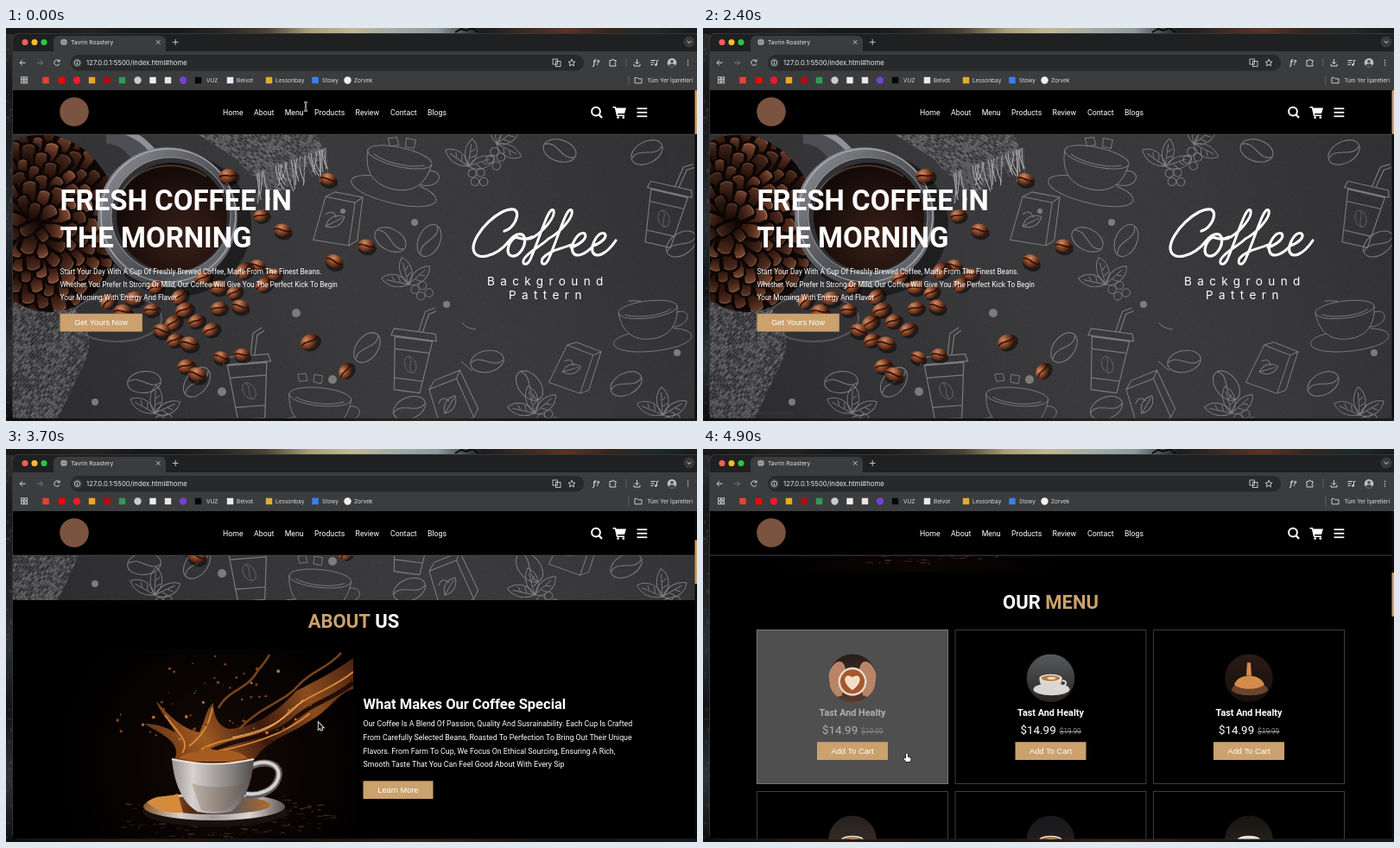
Recreate the animation shown at these times as an HTML page with a canvas. Size 800 by 455 pixels, loop 5000 ms.

```html
<!DOCTYPE html>
<html lang="en">
<head>
<meta charset="utf-8">
<title>Coffee shop page</title>
<style>
html, body { margin: 0; width: 100%; height: 100%; overflow: hidden; background: #111; }
canvas { display: block; width: 800px; height: 455px; }
</style>
</head>
<body>
<canvas id="stage" width="800" height="455"></canvas>
<script>
const GOLD = '#cba16d', LOOP = 5000, STEP = 100;
const UI = 'Inter, sans-serif', BODY = 'Roboto, sans-serif', BTN = '"Liberation Sans", Arial, sans-serif';
const stage = document.getElementById('stage').getContext('2d');
let g = stage;

let seed = 7;
const rnd = () => {
  seed = (seed + 0x6D2B79F5) | 0;
  let v = Math.imul(seed ^ (seed >>> 15), 1 | seed);
  v = (v + Math.imul(v ^ (v >>> 7), 61 | v)) ^ v;
  return ((v ^ (v >>> 14)) >>> 0) / 4294967296;
};
const span = (a, b) => a + (b - a) * rnd();

// Drawing helpers, all on the current context g
const rect = (x, y, w, h, c) => { g.fillStyle = c; g.fillRect(x, y, w, h); };
const round = (x, y, w, h, r, c) => { g.fillStyle = c; g.beginPath(); g.roundRect(x, y, w, h, r); g.fill(); };
const oval = (x, y, rx, ry, c, rot = 0) => {
  g.fillStyle = c; g.beginPath(); g.ellipse(x, y, rx, ry, rot, 0, 7); g.fill();
};
const dot = (x, y, r, c) => oval(x, y, r, r, c);
const ring = (x, y, rx, ry, c, w = 1, rot = 0) => {
  g.strokeStyle = c; g.lineWidth = w; g.beginPath(); g.ellipse(x, y, rx, ry, rot, 0, 7); g.stroke();
};
const fill = (d, c) => { g.fillStyle = c; g.fill(new Path2D(d)); };
const line = (d, c, w = 1) => { g.strokeStyle = c; g.lineWidth = w; g.stroke(new Path2D(d)); };
const text = (s, x, y, font, c = '#fff', align = 'left') => {
  g.font = font; g.fillStyle = c; g.textAlign = align; g.fillText(s, x, y);
};
const at = (x, y, rot, k, fn) => {
  g.save(); g.translate(x, y); g.rotate(rot); g.scale(k, k); fn(); g.restore();
};
const stops = (grad, cols) => {
  cols.forEach((c, i) => grad.addColorStop(i / (cols.length - 1), c));
  return grad;
};
const linear = (x0, y0, x1, y1, ...cols) => stops(g.createLinearGradient(x0, y0, x1, y1), cols);
const radial = (x, y, r, ...cols) => stops(g.createRadialGradient(x, y, 0, x, y, r), cols);
const button = (label, x, y, w, h = 20.8) => {
  rect(x, y, w, h, GOLD);
  text(label, x + w / 2, y + h / 2 + 3.3, '9.28px ' + BTN, '#fff', 'center');
};
const twoTone = (a, ca, b, cb, cx, y) => {
  g.font = 'bold 22px ' + BODY;
  const wa = g.measureText(a).width, x = cx - (wa + g.measureText(b).width) / 2;
  text(a, x, y, g.font, ca);
  text(b, x + wa, y, g.font, cb);
};

// Chalk drawings
const CHALK = '#88888a';
const chalkBean = () => {
  ring(0, 0, 18, 11.5, CHALK);
  line('M-17 -2C-6 -10 6 10 17 2', CHALK);
};
const paperCup = () => {
  line('M-19 -20L-13 33H13L19 -20ZM-23 -21L-21 -28H21L23 -21ZM-17 -8H17M-14 21H14M4 -28L8 -49L17 -54M8 -28L12 -47L19 -51', CHALK);
  at(0, 6, 1.1, .48, chalkBean);
};
const mug = () => line('M-38 -18A38 11 0 1 0 38 -18A38 11 0 1 0 -38 -18M-38 -18C-36 12 -18 20 0 20C18 20 36 12 38 -18' +
  'M37 -10C56 -14 54 10 28 8M-28 10C-66 16 -50 36 4 36C58 36 66 16 30 10M-30 -15C-16 -8 16 -8 30 -15', CHALK);
const cubes = () => line('M-16 -3L-6 -5L-3 4L-13 6ZM5 -5L16 -4L15 6L5 5Z', CHALK);
const bag = () => line('M-18 -22L14 -26L22 20L-16 26ZM-18 -22L-10 -30L20 -34L14 -26M20 -34L29 12L22 20' +
  'M-8 8C-8 -4 0 -8 8 -8C8 2 2 8 -8 8ZM-8 8L6 -6M-12 -4C-8 -10 -4 -10 0 -4', CHALK);
const sprig = () => {
  for (const a of [-.2, .9, 2]) at(0, 0, a, 1, () =>
    line('M0 0C-4 -15 -20 -20 -31 -14C-26 -3 -14 3 0 0M0 0L-25 -11M-9 -5L-10 -12M-16 -8L-18 -14', CHALK));
  for (const [x, y] of [[8, 6], [17, 1], [15, 14], [25, 10]]) ring(x, y, 5, 5, CHALK);
};

const roastBean = (x, y) => at(x, y, span(-1, .4), span(.95, 1.15), () => {
  oval(1.5, 3, 10, 7.5, 'rgba(0,0,0,.5)');
  oval(0, 0, 9.6, 7, radial(-2, -3, 11, '#d08c66', '#8e4a2b', '#3a170b'));
  line('M-9 0C-3 -4 3 4 9 0', '#2a0f07', 1.5);
});

// Coarse cloth: short light and dark threads on a tilted grid
function weave(d, base, rot) {
  g.save();
  g.clip(new Path2D(d));
  fill(d, base);
  g.translate(180, 270); g.rotate(rot);
  for (let y = -260; y < 260; y += 3) for (let x = -260; x < 260; x += 5) {
    const shade = .5 + .5 * Math.sin(y / 11) * Math.cos(x / 17);
    rect(x + span(-2, 2), y, span(2, 5), 1.5, rnd() < .3 + shade * .3 ? 'rgba(150,150,155,.42)' : 'rgba(12,12,15,.5)');
  }
  g.restore();
}

// Scales laid on a golden-angle spiral, outermost first
function pineCone() {
  const n = 120;
  g.save();
  g.beginPath(); g.ellipse(46, 226, 86, 103, -.15, 0, 7); g.clip();
  rect(0, 110, 170, 230, '#140b08');
  for (let i = n; i > 0; i--) {
    const a = i * 2.4, r = Math.sqrt(i / n);
    at(32 + Math.cos(a) * r * 92, 226 + Math.sin(a) * r * 104, a + span(-.25, .25), span(.75, 1.15), () => {
      fill('M-22 -8L8 -11C16 -7 16 7 8 11L-22 8Z', '#0f0705');
      g.globalAlpha = span(.45, 1);
      fill('M-16 -3C-6 -8 2 -9 8 -7C12 -3 12 4 8 6C1 7 -8 5 -16 3Z', linear(-16, 0, 12, 0, '#1d0e09', '#4e2719', '#93573c'));
      line('M8 -7C12 -3 12 4 8 6', '#b5795b', 1.1);
      g.globalAlpha = 1;
    });
  }
  rect(0, 110, 170, 230, linear(8, 0, 140, 0, 'rgba(0,0,0,.25)', 'rgba(0,0,0,0)', 'rgba(0,0,0,.35)'));
  g.restore();
}

function hero() {
  g.save();
  g.beginPath(); g.rect(8, 72, 790, 380); g.clip();
  rect(8, 72, 790, 380, linear(8, 452, 740, 123, '#2b2b2d', '#343437', '#3a3a3c', '#39393b', '#323234'));
  for (let i = 0; i < 4500; i++) rect(span(8, 798), span(123, 452), 1, 1, rnd() < .5 ? 'rgba(255,255,255,.06)' : 'rgba(0,0,0,.16)');

  g.globalAlpha = .85;
  at(452, 167, .22, 1, mug);
  at(458, 132, .1, 1, cubes);
  at(745, 342, -.12, .9, mug);
  at(362, 444, .1, .95, mug);
  at(352, 405, .1, .9, cubes);
  at(469, 383, .13, 1.15, paperCup);
  at(281, 413, -.08, 1.2, paperCup);
  at(763, 214, .22, 1.15, paperCup);
  at(381, 224, .32, 1.08, bag);
  at(655, 395, .5, 1, bag);
  at(514, 436, -.25, 1.05, bag);
  for (const [x, y, r] of [[445, 245, .5], [490, 246, 2], [418, 370, 2.2], [467, 440, -.4], [557, 386, -.2], [606, 414, .9],
    [718, 412, -.5], [160, 410, -.1], [221, 410, -.9], [641, 142, .3], [742, 144, -.5], [782, 250, -.6]]) at(x, y, r, 1.08, chalkBean);
  for (const [x, y, r] of [[535, 160, .4], [466, 297, 0], [568, 134, 1.2], [172, 446, .3], [612, 446, 0], [760, 448, .2]]) at(x, y, r, .95, sprig);
  for (const [x, y, r] of [[473, 225, 4], [336, 330, 5], [378, 407, 5], [103, 433, 4], [390, 212, 3], [510, 320, 4], [250, 421, 5], [777, 376, 4]]) dot(x, y, r, CHALK);
  line('M720 316H735M528 341C532 347 538 348 544 349M527 386L540 397', CHALK);
  g.globalAlpha = 1;

  weave('M8 300C40 290 70 300 80 326C98 345 100 370 91 388C78 412 72 430 60 452H8Z', '#48484b', -.85);
  weave('M222 123H360L371 150L340 164L318 196L294 180L264 150Z', '#535356', .55);
  for (let i = 0; i < 46; i++) {
    const u = i / 45, x = 371 - u * 80, y = 148 + u * 30;
    line(`M${x} ${y - 10}q${span(-4, 4)} 12 ${span(-6, 10)} ${span(18, 38)}`, rnd() < .5 ? '#a9a9ab' : '#57575a', 1.1);
  }
  pineCone();

  oval(198, 228, 86, 83, 'rgba(0,0,0,.45)');
  line('M116 122C142 122 152 140 168 162', '#4d4f54', 24);
  line('M122 117C150 119 164 134 180 154', '#8f9197', 7);
  oval(187, 219, 81, 81, linear(110, 150, 265, 290, '#8f9197', '#63656a', '#45474b', '#7b7d82'));
  ring(188, 217, 78, 77, 'rgba(205,207,212,.6)', 1.6);
  oval(191, 217, 69, 67, '#303135');
  ring(191, 217, 69, 67, 'rgba(170,172,178,.6)', 1.2);
  oval(192, 219, 64, 63, radial(205, 240, 80, '#38201a', '#27150f', '#140a07'));
  line('M133 192C148 160 195 148 232 172', 'rgba(190,150,125,.3)', 2);
  ring(128, 336, 52, 27, 'rgba(150,150,155,.35)', 2);

  const beans = [[257, 171], [295, 217], [320, 234], [373, 175], [417, 252], [380, 270], [310, 285], [291, 275], [275, 281],
    [246, 300], [264, 306], [200, 311], [206, 326], [220, 339], [193, 341], [180, 350], [195, 361], [212, 365], [237, 349],
    [271, 322], [246, 324], [249, 381], [273, 378], [208, 391], [221, 401], [351, 363], [393, 397], [168, 326], [148, 313],
    [173, 300], [228, 289], [298, 297], [135, 328], [118, 316]];
  for (const [x, y] of beans) roastBean(x, y);

  // Script lettering
  g.lineCap = g.lineJoin = 'round';
  line('M577 235C588 232 597 214 588 210C572 207 541 237 541 255C542 271 567 266 583 246' +
    'C590 237 598 237 600 242C603 252 594 265 586 264C578 263 580 249 590 242C596 244 602 246 609 242', '#fff', 3.2);
  line('M607 244C620 238 637 219 634 211C628 206 620 238 607 268C603 276 596 274 600 267C607 257 619 253 628 244' +
    'C640 238 658 219 655 211C649 206 641 238 628 268C624 276 618 274 621 267C629 257 643 256 654 251', '#fff', 2.9);
  line('M654 254C664 251 674 243 670 238C663 235 653 250 656 259C660 268 673 260 680 252' +
    'C689 249 697 242 693 238C686 235 677 250 679 259C683 268 696 261 706 246', '#fff', 3.1);
  g.letterSpacing = '6.4px';
  text('Background', 557, 297.7, '13.5px ' + UI);
  text('Pattern', 582, 313.7, '13.5px ' + UI);
  g.letterSpacing = '0px';

  text('FRESH COFFEE IN', 62.5, 211.2, 'bold 33px ' + BODY);
  text('THE MORNING', 62.5, 254.1, 'bold 33px ' + BODY);
  ['Start Your Day With A Cup Of Freshly Brewed Coffee, Made From The Finest Beans.',
    'Whether You Prefer It Strong Or Mild, Our Coffee Will Give You The Perfect Kick To Begin',
    'Your Morning With Energy And Flavor'].forEach((s, i) => text(s, 62.5, 285 + i * 14.9, '8.25px ' + BODY));
  button('Get Yours Now', 62.5, 330.7, 95.3);
  g.restore();
}

function splashPhoto() {
  g.save();
  g.beginPath(); g.rect(62, 200, 340, 227); g.clip();
  rect(62, 200, 340, 227, radial(250, 330, 190, '#170b06', '#090403', '#000'));
  for (let i = 0; i < 170; i++) {
    const a = span(0, 6.3), d = Math.sqrt(rnd());
    oval(250 + Math.cos(a) * d * 135, 392 + Math.sin(a) * d * 27, span(1, 5), span(.4, 1.1), `rgba(150,110,88,${span(.1, .4)})`);
  }
  oval(242, 388, 84, 17, '#17110f');
  oval(241, 382, 82, 16, linear(160, 0, 322, 0, '#8a5a35', '#d8cec6', '#a19a98', '#ddd6d2', '#5d5654'));
  oval(240, 380, 66, 11, linear(170, 0, 310, 0, '#c06f25', '#4e2813', '#5f5a59', '#b66a2a'));
  fill('M163 377C175 367 186 372 199 367L205 389C190 390 172 386 163 377Z', '#d68a3a');

  fill('M194 330C206 308 180 298 160 286C176 286 188 292 196 296C188 282 178 272 174 260C190 278 204 292 224 296' +
    'C232 280 230 272 240 262C240 280 248 290 258 292C292 290 318 268 336 248C356 238 380 226 402 210V246' +
    'C384 250 376 270 350 284C326 300 302 304 286 330Z', linear(170, 330, 402, 215, '#5c2d12', '#a05a22', '#3c1a0c', '#8c4c1e', '#4d240f'));
  line('M204 320C214 306 198 296 184 276M226 316C250 300 292 306 322 278C346 252 372 250 402 226M246 318C282 310 320 300 352 274M212 312C228 300 236 284 239 268', '#d98a3a', 1.8);
  line('M236 318C272 300 306 304 330 284C352 262 380 258 402 238', '#200d06', 5);
  line('M262 302C300 294 322 284 344 258', '#ffc878', 1);
  line('M246 268C256 248 278 246 288 230C294 220 300 216 305 206M270 292C300 262 322 262 340 240C356 224 372 222 388 204', '#7a431d', 2.6);
  for (let i = 0; i < 58; i++) {
    const a = span(-3, -.3), d = span(35, 125);
    dot(245 + Math.cos(a) * d, 318 + Math.sin(a) * d * .9, span(.5, 2), rnd() < .6 ? '#7d4220' : '#b56e31');
  }

  line('M282 336C303 326 320 334 315 349C311 364 292 371 278 368', '#625e5e', 8);
  line('M282 335C304 325 319 335 315 349C311 363 293 369 278 367', '#d4d0ce', 4);
  fill('M192 327C195 361 208 380 222 388Q241 392 260 388C276 378 285 355 287 327Q240 338 192 327Z',
    linear(192, 0, 288, 0, '#9a9492', '#d6d2d0', '#aaa5a4', '#807c7c', '#4d4849'));
  fill('M215 355Q244 364 276 355C270 370 264 379 256 386Q240 389 226 386Z', 'rgba(110,72,48,.25)');
  line('M192 327Q240 338 287 327', '#f0ddca', 2);
  fill('M200 326C214 314 222 324 232 312C242 322 262 310 280 326Q240 334 200 326Z', '#a65b21');
  g.restore();
}

function about() {
  at(0, 309, 0, 1, splashPhoto);
  twoTone('ABOUT ', GOLD, 'US', '#fff', 402.5, 483.8);
  text('What Makes Our Coffee Special', 413.5, 577.8, 'bold 16.5px ' + BODY);
  ['Our Coffee Is A Blend Of Passion, Quality And Susrainability. Each Cup Is Crafted',
    'From Carefully Selected Beans, Roasted To Perfection To Bring Out Their Unique',
    'Flavors. From Farm To Cup, We Focus On Ethical Sourcing, Ensuring A Rich,',
    'Smooth Taste That You Can Feel Good About With Every Sip'].forEach((s, i) => text(s, 413.5, 598 + i * 15.8, '8.77px ' + BODY));
  button('Learn More', 413.5, 661.3, 81);
  twoTone('OUR ', '#fff', 'MENU', GOLD, 402.5, 778.8);
}

// Round dish photo: backdrop, table, saucer, drink
const DISHES = [['#251d19', '#5b3b2b', '#b58a70', '#a9562a'], ['#565a5d', '#292320', '#d9d7d3', '#b97b43'],
  ['#2b1a14', '#15100e', '#6b4431', '#d58b4b'], ['#24211f', '#443429', '#d3cac0', '#b27a4a'],
  ['#17191d', '#2b211d', '#d5d2cf', '#c4682c'], ['#141612', '#35251c', '#d3c7b5', '#e6dfd0']];
function dish(x, y, n) {
  const [wall, table, plate, drink] = DISHES[n];
  g.save();
  g.beginPath(); g.arc(x, y, 27.8, 0, 7); g.clip();
  rect(x - 28, y - 28, 56, 56, linear(x, y - 28, x, y + 28, wall, table));
  at(x, y, 0, 1, () => {
    if (n === 0) {
      fill('M-28 -4C-22 -22 -10 -24 -8 -10L-12 20L-24 24ZM28 -4C22 -22 10 -24 8 -10L12 20L24 24Z', '#b98468');
      dot(0, 4, 16.5, '#e3d9cf');
      dot(0, 4, 14, drink);
      fill('M0 14C-14 4 -9 -7 0 -1C9 -7 14 4 0 14Z', '#f1dfc8');
    } else {
      oval(1, 13, 21, 7, plate);
      if (n === 2) fill('M-17 8C-14 -6 14 -7 18 8C8 14 -8 14 -17 8ZM-3 -3L-2 -18H2L3 -3Z', drink);
      else {
        fill('M-13 0H13C13 9 8 14 0 14C-8 14 -13 9 -13 0Z', plate);
        line('M13 3C20 2 19 10 11 9', plate, 2);
        oval(0, 0, 13, 4.5, '#eee8e0');
        oval(0, 0, 11, 3.4, drink);
        oval(1, 0, 5, 1.6, '#f0d9b8');
      }
    }
  });
  g.restore();
}

function card(n, hover = 0) {
  const x = 62.5 + (n % 3) * 229.5, y = 803.5 + Math.floor(n / 3) * 187, cx = x + 110.5;
  const bg = Math.round(255 * hover), fg = `rgb(${255 - bg},${255 - bg},${255 - bg})`;
  rect(x, y, 221, 178, `rgb(${bg},${bg},${bg})`);
  g.strokeStyle = hover ? '#777' : '#3d3d3d'; g.lineWidth = 1; g.strokeRect(x, y, 221, 178);
  dish(cx, y + 55.8, n);
  text('Tast And Healty', cx, y + 99.8, 'bold 10.85px ' + BODY, fg, 'center');
  text('$14.99', cx - 35, y + 120.8, '13.4px ' + BODY, fg);
  g.globalAlpha = .8;
  text('$19.99', cx + 10.3, y + 120.8, '300 8.25px ' + BODY, fg);
  rect(cx + 10, y + 117.6, 25.5, .7, fg);
  g.globalAlpha = 1;
  button('Add To Cart', cx - 41, y + 129.7, 82);
}

function layer(w, h, paint) {
  const c = document.createElement('canvas');
  c.width = w; c.height = h;
  g = c.getContext('2d');
  paint();
  g = stage;
  return c;
}

const globe = (x, y, r) => {
  dot(x, y, r, '#c4c6c8');
  line(`M${x - r} ${y}H${x + r}M${x} ${y - r}V${y + r}`, '#55585b', .6);
  ring(x, y, r * .5, r, '#55585b', .6);
};

function chrome() {
  rect(0, 0, 800, 455, '#151719');
  rect(0, 0, 800, 7, linear(0, 0, 800, 0, '#191919', '#1d1b1a', '#26221f', '#171819', '#1a1918', '#2a2622', '#4a4134', '#a99c78',
    '#c2b894', '#a3aca4', '#8d9a9c', '#1c1d1e', '#3a2a22', '#5a3326', '#33251d', '#1f2b27', '#171a1a'));
  rect(0, 7, 8, 448, linear(0, 0, 0, 455, '#30302f', '#151719', '#202122', '#292f36', '#101214', '#2f3337', '#0c0d0e'));
  for (let i = 0; i < 45; i++) rect(span(0, 5), span(20, 450), span(1, 4), span(1, 4), 'rgba(110,115,120,.18)');
  line('M520 5L527 1L533 3L540 0L547 5', '#08090a', 2);
  rect(0, 451, 800, 4, linear(0, 0, 800, 0, '#0c0d0e', '#271c18', '#111', '#35231b', '#121313', '#1a1b1c'));
  round(7, 6, 800, 446, 8, '#4b4b4b');
  round(7.5, 6.5, 800, 445, 8, '#1f2022');
  ['#fe5f57', '#febc2e', '#28c840'].forEach((c, i) => dot(22 + i * 11, 16.5, 3.5, c));
  round(55, 9, 130, 22, 6, '#3b3c3d');
  rect(8, 27, 792, 45, '#3b3c3d');
  globe(67, 16.3, 3.6);
  text('Tavrin Roastery', 75, 18.8, '6.7px ' + UI, '#e4e5e6');
  line('M174 14.2L178.4 18.6M178.4 14.2L174 18.6M192.8 16.4H199.6M196.2 13V19.8', '#d0d1d2', .9);
  dot(791, 16, 6.5, '#38393b');
  line('M788.6 15L791 17.4L793.4 15', '#ddd', 1);

  // Toolbar
  round(75, 31, 594, 18.5, 9, '#28292a');
  line('M22.5 40.2H16M19 37.2L16 40.2L19 43.2', '#d5d6d7', 1);
  line('M36 40.2H42.5M39.5 37.2L42.5 40.2L39.5 43.2', '#77787a', 1);
  line('M61.8 38.4A3.2 3.2 0 1 0 62 41.4M62 36.5V38.8H59.7', '#d5d6d7', 1);
  dot(82.5, 40.2, 5.8, '#3b3c3d');
  ring(82.5, 40.2, 3.2, 3.2, '#ddd', .8);
  rect(82.1, 39.8, .9, 2.2, '#ddd'); rect(82.1, 38.2, .9, .9, '#ddd');
  text('127.0.0.1:5500/index.html#home', 93, 43, '7.75px ' + UI, '#e8e9ea');
  g.strokeStyle = '#c8c9ca'; g.lineWidth = .9;
  g.strokeRect(633, 36, 5.5, 6); g.strokeRect(636.5, 38.5, 5.5, 6);
  line('M655 36.2L656.2 39L659 39.2L656.8 41L657.6 43.9L655 42.3L652.4 43.9L653.2 41L651 39.2L653.8 39Z', '#d5d6d7', .9);
  text('f?', 679.5, 43, 'italic bold 8px ' + UI, '#ddd');
  line('M699 37.5H701.2A1.3 1.3 0 0 1 703.8 37.5H706V40A1.3 1.3 0 0 0 706 42.5V44H699Z', '#d5d6d7', 1);
  rect(717.5, 35, .8, 10, '#666');
  line('M730.5 36V41.5M728 39.2L730.5 41.7L733 39.2M727 41.8V44H734V41.8', '#d5d6d7', 1);
  line('M746.5 37.5H752M746.5 40H750.5M746.5 42.5H749.5M753.5 42.5V37.5H755.5', '#d5d6d7', 1);
  dot(752.4, 42.6, 1.3, '#d5d6d7');
  dot(771, 40.2, 5.3, '#b9c1c9');
  dot(771, 38.8, 1.8, '#45484b');
  fill('M767 43.8C768 40.5 774 40.5 775 43.8C773 45.9 769 45.9 767 43.8Z', '#45484b');
  for (let i = -1; i < 2; i++) dot(789.5, 40.2 + i * 2.8, .75, '#ddd');

  // Bookmarks
  g.strokeStyle = '#d5d6d7'; g.lineWidth = .9;
  for (const x of [17.6, 21.8]) for (const y of [56.8, 61]) g.strokeRect(x, y, 2.8, 2.8);
  ['#e54335', '#f00', '#f5182d', '#f2a51d', '#b9090f', '#2e9a5b', '#c9cbcd', '#eceded', '#e9e4df', '#7440d4', '#060606', '#e9e7f4', '#e1ad2c', '#3a80ec', '#f2f2f2']
    .forEach((c, i) => {
      const x = [46, 64.5, 82, 99.5, 117, 134.5, 152.5, 170, 187.5, 205, 222.5, 259.5, 304.5, 358, 395.5][i];
      if ([2, 6, 9, 14].includes(i)) dot(x, 60.5, 4.2, c);
      else rect(x - 3.7, 56.8, 7.4, 7.4, c);
    });
  [['VUZ', 232], ['Belvot', 267], ['Lessonbay', 312], ['Stowy', 366], ['Zorvek', 403]]
    .forEach(([s, x]) => text(s, x, 63, '6.5px ' + UI, '#dcddde'));
  rect(720.5, 55, .8, 11, '#66686a');
  line('M728 57.5H730.8L732 58.8H736V63.8H728Z', '#d5d6d7', .9);
  text('Tüm Yer İşaretleri', 795, 63, '6.4px ' + UI, '#dcddde', 'right');
}

function header() {
  rect(8, 72, 792, 51, '#000');
  dot(79, 97, 16.8, '#7b5341');
  ring(683, 96.6, 4.9, 4.9, '#fff', 2);
  line('M686.5 100.2L690 104', '#fff', 2.2);
  fill('M702.5 91H705.8L706.5 92.6H718L716 99H708L708.4 100.6H716V102H707L704.8 92.5H702.5Z', '#fff');
  dot(708.6, 103.6, 1.4, '#fff'); dot(714.8, 103.6, 1.4, '#fff');
  for (const y of [92.4, 96.9, 101.4]) rect(730.5, y, 11.8, 1.7, '#fff');
}

const page = layer(800, 1170, () => {
  rect(0, 0, 800, 1170, '#000');
  hero();
  about();
  for (let n = 0; n < 6; n++) card(n);
});
const frame = layer(800, 455, () => { chrome(); header(); });

// Motion: [time, ...values]
const SCROLL = [[0, 0], [3100, 0], [3200, 50], [3300, 113], [3400, 168], [3500, 214], [3600, 250], [3700, 277], [3850, 301],
  [4000, 309], [4200, 309], [4350, 375], [4500, 414], [4600, 414], [4700, 462], [4800, 534], [4900, 594]];
const POINTER = [[0, 347, 91], [200, 340, 96], [700, 262, 98], [1200, 375, 98], [1600, 466, 98], [1700, 485, 98], [1900, 504, 99],
  [2000, 514, 112], [2600, 420, 250], [3300, 359, 316], [3500, 359, 316], [3800, 363, 317], [4100, 363, 317], [4600, 269, 330], [4900, 235, 353]];
const track = (keys, t) => {
  const i = keys.findIndex(k => k[0] > t);
  if (i < 0) return keys[keys.length - 1].slice(1);
  if (i === 0) return keys[0].slice(1);
  const a = keys[i - 1], b = keys[i], u = (t - a[0]) / (b[0] - a[0]);
  return a.slice(1).map((v, j) => v + (b[j + 1] - v) * u);
};

const NAV = [['Home', 251, 275], ['About', 287, 311], ['Menu', 322.7, 345], ['Products', 357, 393], ['Review', 404.5, 433], ['Contact', 445, 476], ['Blogs', 488, 510]];
const hovered = t => {
  const [x, y] = track(POINTER, t);
  return y > 92 && y < 105 ? NAV.findIndex(n => x >= n[1] && x <= n[2]) : -1;
};

function status(t) {
  for (let age = 0; age <= 500 && age <= t; age += STEP) {
    const i = hovered(t - age);
    if (i < 0) continue;
    g.globalAlpha = age <= 300 ? 1 : Math.max(0, 1 - (age - 300) / 220);
    round(8, 440, 114, 11.5, [0, 3, 0, 0], '#232425');
    text('127.0.0.1:5500/index.html#' + NAV[i][0].toLowerCase(), 10, 448.4, '6.4px ' + UI, '#c6c7c8');
    g.globalAlpha = 1;
    return;
  }
}

function pointer(t) {
  if (t >= 2300 && t < 2600) return;
  const [x, y] = track(POINTER, t);
  const hand = hovered(t) >= 0 || t >= 4800;
  const beam = t < 100 || (t >= 2600 && t < 3600);
  at(x, y, 0, 1, () => {
    if (hand) {
      const d = 'M0 0C1 -1 2 0 2 1V3.5L5 4.5C6 5 5.5 8 4.5 9H0L-2.6 5.4C-2.5 4.4 -1 4.6 0 5.5Z';
      line(d, '#111', 1.4); fill(d, '#fff');
    } else if (beam) {
      const d = 'M-2 -5Q0 -5 0 -3.5Q0 -5 2 -5M0 -3.5V3.5M-2 5Q0 5 0 3.5Q0 5 2 5M-1.3 1.5H1.3';
      line(d, '#ddd', 1.8); line(d, '#333', .8);
    } else {
      const d = 'M0 0V8L1.9 6.3L3.2 9.1L4.6 8.4L3.3 5.8H5.8Z';
      line(d, '#fff', 1.6); fill(d, '#111');
    }
  });
}

function draw(t) {
  const [y] = track(SCROLL, t);
  g.drawImage(frame, 0, 0);
  g.save();
  g.beginPath(); g.rect(8, 123, 792, 328.5); g.clip();
  g.translate(0, -y);
  g.drawImage(page, 0, 0);
  if (t >= 4860) card(0, Math.min(1, (t - 4838) / 200));
  g.restore();
  rect(8, 122.7, 790, .9, '#4a4a4a');
  rect(797.5, 72, 2.5, 379.5, '#0b0b0b');
  round(797.5, 72 + track(SCROLL, Math.max(0, t - STEP))[0] * .133, 2.5, 51, 1, GOLD);
  const hot = [hovered(t), hovered(Math.max(0, t - STEP))];
  NAV.forEach(([s, x], i) => text(s, x, 100.7, '8.77px ' + BODY, hot.includes(i) ? GOLD : '#fff'));
  status(t);
  pointer(t);
}

const start = performance.now();
function tick() {
  const t = (performance.now() - start) % LOOP;
  draw(Math.floor(t / STEP) * STEP);
  requestAnimationFrame(tick);
}
tick();
</script>
</body>
</html>
```
